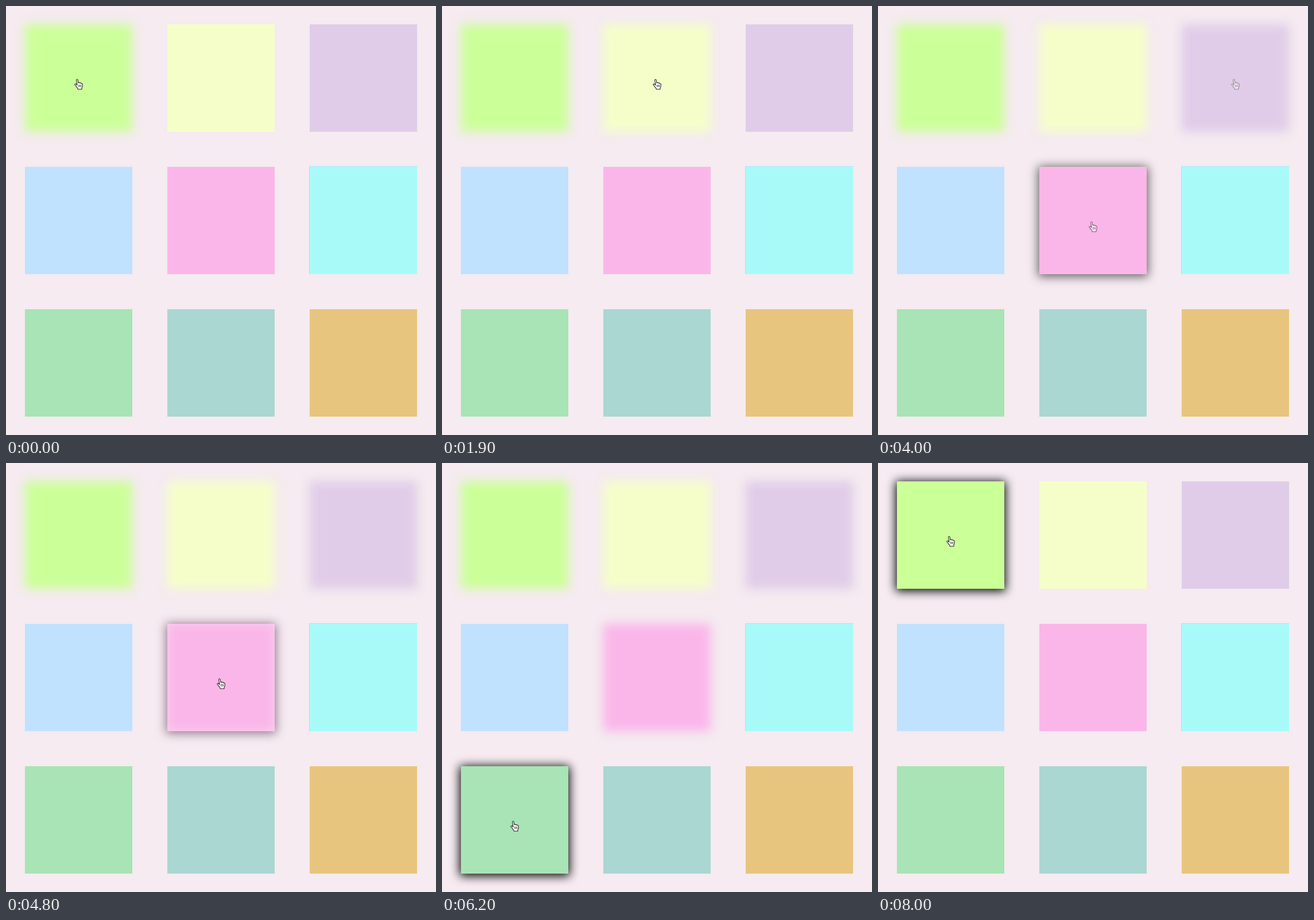
These frames come from a looping animation (749 by 747 pixels, 8300 ms). An HTML page:

```html
<!DOCTYPE html>
<html lang="en">
<head>
<meta charset="utf-8">
<title>Blurring squares</title>
<style>
  html, body { margin: 0; width: 100%; height: 100%; overflow: hidden; background: #f5ebf0; }
  svg { display: block; width: 749px; height: 747px; }
  .blur { filter: blur(8.5px); }
</style>
</head>
<body>
<svg viewBox="0 0 749 747">
  <defs>
    <g id="hand" stroke-linecap="round" stroke-linejoin="round">
      <path fill="#fff" stroke="#222" stroke-width="1.1" d="M3.6 2.2C3.6.4 6 .4 6.2 2L7 7C7.5 6 9.3 6.2 9.5 7.2C10.2 6.5 11.6 6.8 11.9 7.9C12.8 7.4 14.2 8 14.2 9.3V12.5C14.2 14 13 15 13 16.2V18H6.2L6 16.5C4.5 14.5 2 11.8.9 10C.5 8.6 2.3 8.2 3.2 9L5 10.8Z"/>
      <path fill="none" stroke="#333" stroke-width=".9" d="M7.6 10.5V13.6M9.6 10.5V13.6M11.6 10.5V13.6"/>
    </g>
  </defs>
  <g id="under"></g>
  <g id="over"></g>
</svg>
<script>
const LOOP = 8300, TICK = 100, SIZE = 187, PITCH = 248;
const COLORS = ['#cbff98', '#f5fec9', '#e0cce8', '#c0e2ff', '#fab6e9',
                '#a8faf9', '#a8e4b5', '#aad7d2', '#e8c57e'];
const VISITED = [0, 1, 2, 4, 6];
// Start time and number of ticks of each crossfade.
const FADES = [[0, 1], [600, 5], [1400, 4], [2200, 4], [3000, 4],
               [3800, 5], [4600, 5], [5500, 5], [6300, 4], [7000, 5]];

const under = document.getElementById('under');
const over = document.getElementById('over');

const left = i => 33 + PITCH * (i % 3);
const top_ = i => 32 + PITCH * Math.floor(i / 3);

function rect(x, y, w, h, fill, extra = '') {
  return `<rect x="${x}" y="${y}" width="${w}" height="${h}" fill="${fill}" ${extra}/>`;
}

function square(i, blurred, hovered) {
  const x = left(i), y = top_(i);
  const shadow = hovered
    ? rect(x - 2, y, SIZE + 4, SIZE + 4, '#000', 'class="blur"') : '';
  const edge = i === 5 ? rect(x - 1, y - 1, SIZE + 1, SIZE + 1, '#a5e6f2') : '';
  return shadow + edge + rect(x, y, SIZE, SIZE, COLORS[i], blurred ? 'class="blur"' : '');
}

// Even scenes: the visited square is blurred; odd scenes: the next one is hovered.
function scene(n) {
  const last = n === FADES.length - 1;
  const done = last ? [] : VISITED.slice(0, Math.floor(n / 2) + 1);
  const active = last ? 0 : VISITED[Math.ceil(n / 2)];
  const hovering = n % 2 === 1;
  const squares = COLORS.map((_, i) => square(i, done.includes(i), hovering && i === active));
  return rect(0, 0, 749, 747, '#f5ebf0') + squares.join('') +
    `<use href="#hand" x="${left(active) + 86}" y="${top_(active) + 95}"/>`;
}

let shown = -1;
function draw(ms) {
  const t = Math.floor((ms % LOOP) / TICK) * TICK;
  const n = FADES.findLastIndex(([start]) => start <= t);
  const [start, ticks] = FADES[n];
  if (n !== shown) {
    under.innerHTML = n ? scene(n - 1) : '';
    over.innerHTML = scene(n);
    shown = n;
  }
  over.setAttribute('opacity', Math.min(1, ((t - start) / TICK + 1) / ticks));
}

const origin = performance.now();
function loop() {
  draw(performance.now() - origin);
  requestAnimationFrame(loop);
}
loop();
</script>
</body>
</html>
```
